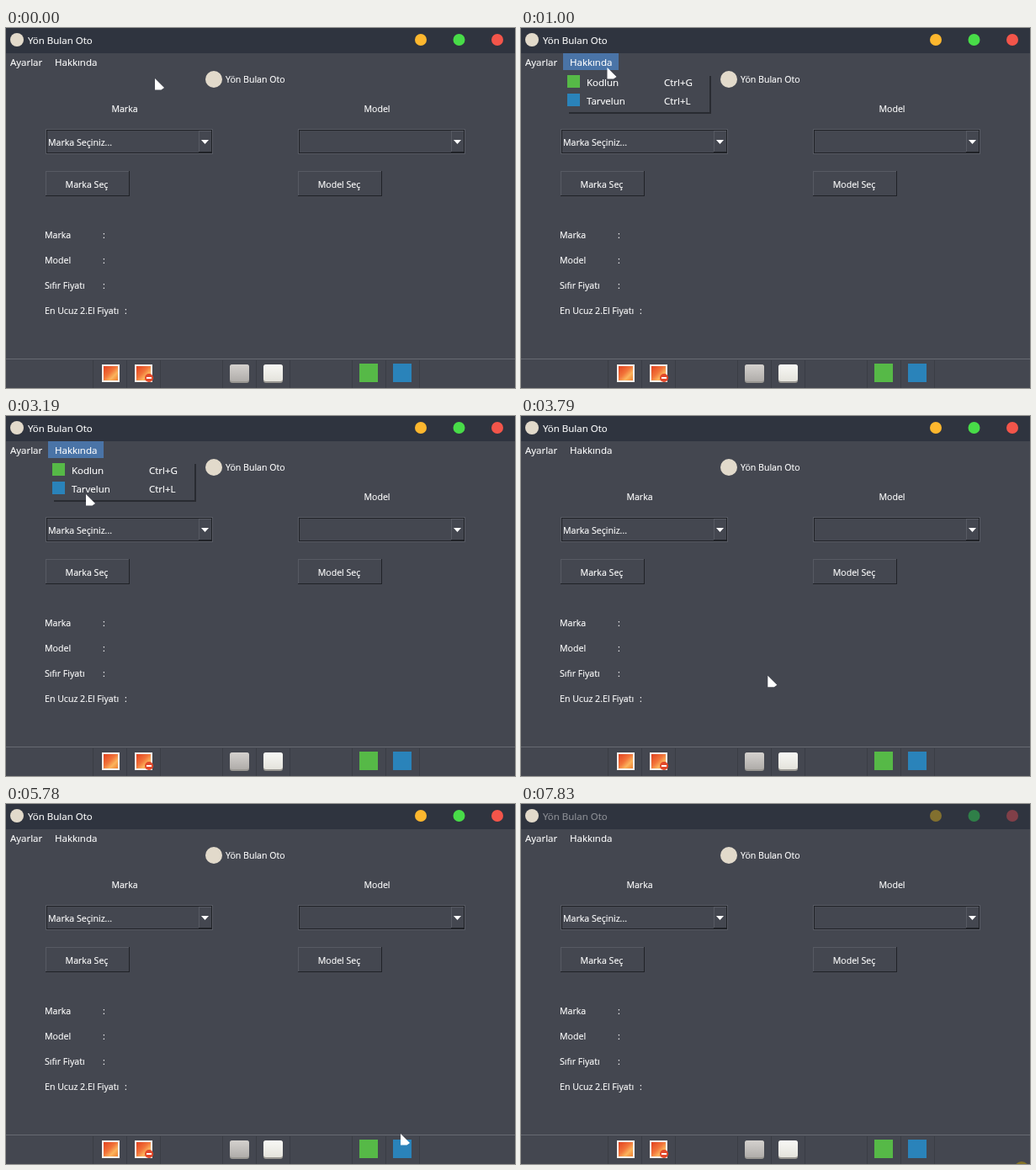
These frames come from a looping animation (605 by 428 pixels, 7900 ms). An HTML page:

```html
<!DOCTYPE html>
<html lang="tr">
<head>
<meta charset="utf-8">
<title>Yön Bulan Oto</title>
<style>
html, body { margin: 0; width: 100%; height: 100%; overflow: hidden; background: #444750; }
svg { display: block; }
text { font: 10.6px "Open Sans", "Noto Sans", sans-serif; fill: #fff; stroke: #fff; stroke-width: .15; white-space: pre; }
text.big { font-size: 11.5px; }
</style>
</head>
<body>
<svg id="stage" width="605" height="428" viewBox="0 0 605 428">
  <defs>
    <linearGradient id="fire" x2="1" y2="1">
      <stop offset="0" stop-color="#e2401f"/>
      <stop offset=".45" stop-color="#f2743a"/>
      <stop offset=".7" stop-color="#fbb45c"/>
      <stop offset="1" stop-color="#f08030"/>
    </linearGradient>
    <linearGradient id="grey" x2="0" y2="1">
      <stop offset="0" stop-color="#d4d1ce"/><stop offset="1" stop-color="#b0adaa"/>
    </linearGradient>
    <linearGradient id="white" x2="0" y2="1">
      <stop offset="0" stop-color="#f8f8f5"/><stop offset="1" stop-color="#e4e3dc"/>
    </linearGradient>
  </defs>
</svg>
<script>
const FRAMES = 119, LOOP = 7900, STEP = LOOP / FRAMES;
const BODY = '#444750', DARK = '#202227', LIGHT = '#575a63';
const GREEN = '#56b947', BLUE = '#2a83ba', CREAM = '#e2dacb';
const BRIGHT = ['#fdb72e', '#48dc48', '#f3554a'], DIM = ['#82702f', '#2f7f48', '#803f48'];
const NAME = 'Yön Bulan Oto';

const rect = (x, y, w, h, fill, more = '') =>
  `<rect x="${x}" y="${y}" width="${w}" height="${h}" fill="${fill}" ${more}/>`;
const dot = (x, y, r, fill, more = '') =>
  `<circle cx="${x}" cy="${y}" r="${r}" fill="${fill}" ${more}/>`;
const text = (x, y, s, more = '') => `<text x="${x}" y="${y}" ${more}>${s}</text>`;
const big = (x, y, s) => text(x, y, s, 'class="big"');
const mid = (x, y, s) => text(x, y, s, 'text-anchor="middle"');
const group = (id, s) => `<g id="${id}">${s}</g>`;
const each = (list, draw) => list.map(draw).join('');

// Bevelled frame: tl colours the top and left edges, br the others
const bevel = (x, y, w, h, tl, br) =>
  rect(x, y, w, 1, tl) + rect(x, y, 1, h, tl) +
  rect(x, y + h - 1, w, 1, br) + rect(x + w - 1, y, 1, h, br);

// Heading, drop-down and button for one choice
const column = (x, name, value) =>
  mid(x + 94, 100, name) +
  bevel(x, 120, 199, 30, LIGHT, LIGHT) + bevel(x + 1, 121, 197, 28, DARK, DARK) +
  bevel(x + 182, 122, 16, 26, LIGHT, DARK) +
  `<path d="M${x + 185} 133h9l-4.5 5z" fill="#fff"/>` + text(x + 3, 140, value) +
  bevel(x, 170, 100, 30, LIGHT, DARK) + mid(x + 49, 190, name + ' Seç');

const picture = x =>
  rect(x, 400, 21, 21, '#f4f1ec') + rect(x + 2, 402, 17, 17, 'url(#fire)');

const keycap = (x, fill) =>
  rect(x, 400, 23, 22, '#999792', 'rx="3"') + rect(x, 400, 23, 20, `url(#${fill})`, 'rx="3"');

const menuItem = (y, fill, name, keys) =>
  rect(55, y - 13, 15, 15, fill) + big(78, y, name) + big(170, y, keys);

const hover = (id, x) => group(id, bevel(x, 395, 32, 33, LIGHT, DARK));

document.getElementById('stage').innerHTML +=
  rect(0, 0, 605, 428, BODY) + rect(0, 0, 605, 30, '#2f343f') +
  dot(13, 14, 8, CREAM) + group('caption', big(26, 19, NAME)) +
  group('lamps', each(BRIGHT, (c, i) => dot(493 + 45.5 * i, 14, 7, c))) +
  rect(50, 30, 66, 20, '#4a74a7', 'id="active"') +
  big(5, 45, 'Ayarlar') + big(58, 45, 'Hakkında') +
  dot(247, 61, 10, CREAM) + text(261, 65, NAME) +
  column(47, 'Marka', 'Marka Seçiniz...') + column(347, 'Model', '') +
  each(['Marka', 'Model', 'Sıfır Fiyatı', 'En Ucuz 2.El Fiyatı'], (s, i) =>
    text(46, 250 + 30 * i, s) + text(i < 3 ? 115 : 141, 250 + 30 * i, ':')) +
  rect(0, 393, 605, 1, '#676a72') +
  each([103, 257, 411], x =>
    each([0, 40, 80], d => rect(x + d, 395, 1, 33, '#3a3d45'))) +
  picture(114) + picture(153) + dot(170, 416, 5, '#e2482a') + rect(167, 415, 6, 2, '#fff') +
  keycap(266, 'grey') + keycap(306, 'white') +
  rect(420, 399, 22, 22, GREEN) + rect(460, 399, 22, 22, BLUE) +
  hover('hoverGreen', 416) + hover('hoverBlue', 456) +
  group('menu',
    rect(57, 57, 169, 45, '#292b31') + rect(52, 50, 172, 50, BODY) +
    menuItem(69, GREEN, 'Kodlun', 'Ctrl+G') + menuItem(91, BLUE, 'Tarvelun', 'Ctrl+L')) +
  dot(595, 434, 9, '#857427', 'id="halo"') +
  '<path id="cursor" d="M0 0V13.5H7.5L11 11Z" fill="#fff"/>';

// Pointer stops: step, x, y
const stops = [
  [0, 177, 60], [10, 94, 44], [15, 102.5, 47], [23, 62, 68], [28, 142, 72],
  [32, 85, 83.5], [48, 95, 93], [56, 288, 300], [63, 384, 460], [66, 432, 418],
  [72, 432, 412.5], [76, 402, 402], [87, 469, 392], [98, 474, 410], [109, 474, 412],
  [114, 600, 440], [FRAMES, 600, 440]
];

function pointer(k) {
  const i = stops.findIndex(s => s[0] > k);
  const [k0, x0, y0] = stops[i - 1], [k1, x1, y1] = stops[i];
  const u = (k - k0) / (k1 - k0), e = u * u * (3 - 2 * u);
  return [x0 + (x1 - x0) * e, y0 + (y1 - y0) * e];
}

const get = id => document.getElementById(id);
const show = (id, on) => get(id).setAttribute('visibility', on ? 'visible' : 'hidden');
const lamps = get('lamps').children;

function draw(now) {
  const k = Math.floor((now % LOOP + 9) / STEP) % FRAMES;
  const [x, y] = pointer(k);
  const open = k >= 9 && k < 56, blurred = k === FRAMES - 1;
  const over = left => y >= 395 && y < 428 && x >= left && x < left + 32;

  get('cursor').setAttribute('transform', `translate(${x} ${y})`);
  show('menu', open);
  show('active', open);
  show('hoverGreen', over(416));
  show('hoverBlue', over(456));
  show('halo', blurred);
  get('caption').setAttribute('opacity', blurred ? .45 : 1);
  (blurred ? DIM : BRIGHT).forEach((c, i) => lamps[i].setAttribute('fill', c));
}

const start = performance.now();
function tick() {
  draw(performance.now() - start);
  requestAnimationFrame(tick);
}
tick();
</script>
</body>
</html>
```
